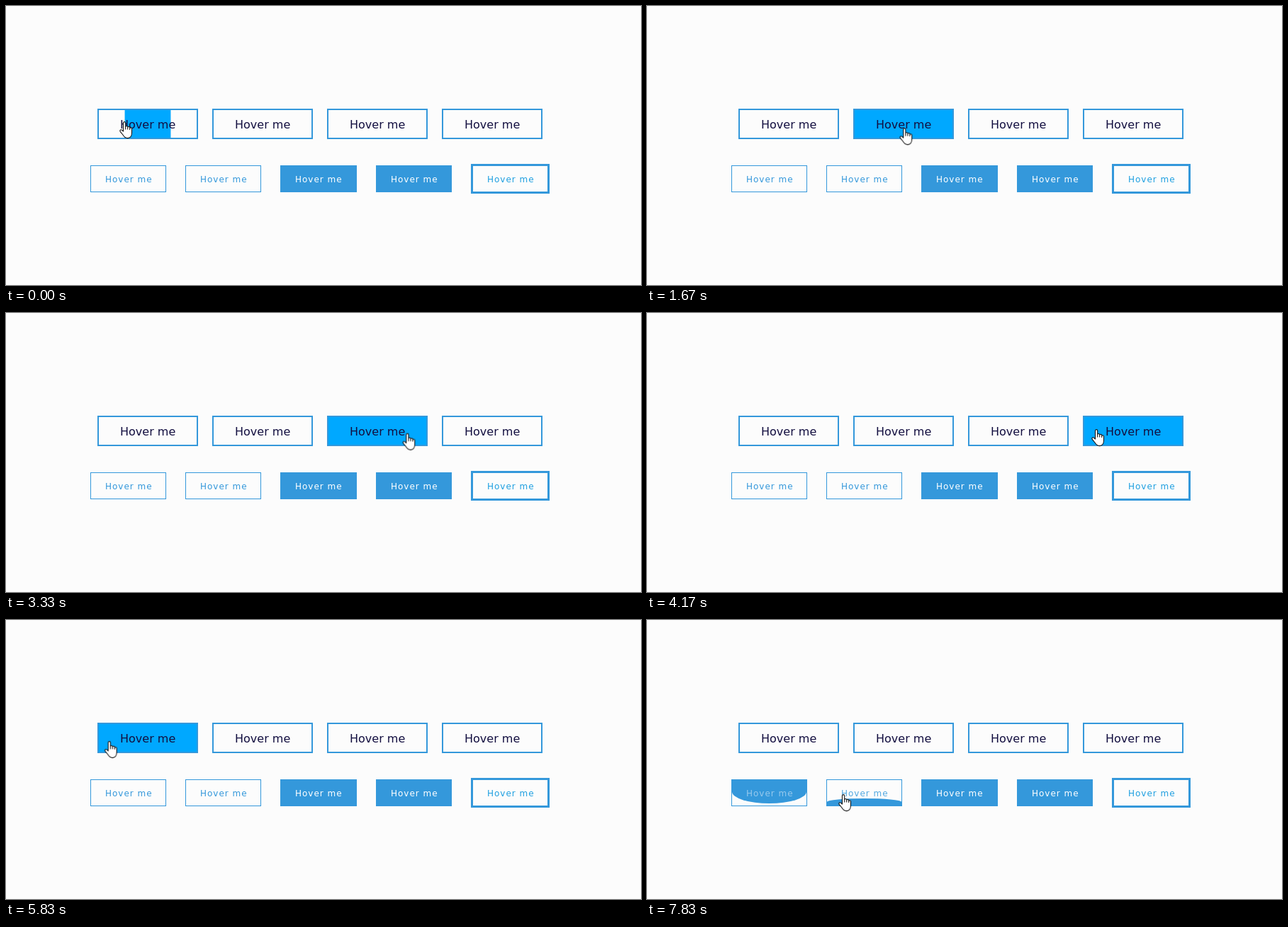
Write an HTML page that moves like this. It is 896x394 px and loops after 8 s.

```html
<!DOCTYPE html>
<html lang="en">
<head>
<meta charset="utf-8">
<title>Button hover effects</title>
<style>
  html, body { margin: 0; width: 100%; height: 100%; overflow: hidden; background: #fcfcfc; }
  body { position: relative; font-family: "DejaVu Sans", Verdana, sans-serif; }

  .btn {
    position: absolute; left: var(--x); box-sizing: border-box;
    overflow: hidden; border: solid #3498db; white-space: pre;
  }
  .btn span { position: absolute; top: 1px; }
  .btn i { position: absolute; }

  .large { top: 144.5px; width: 142px; height: 43px; border-width: 2px; font-size: 16px; line-height: 39px; color: #130f40; }
  .large span { left: 30px; }
  .large i { inset: 0; background: #00a8ff; }
  .large .diagonal { inset: -50px 0; }

  .small { top: 225px; width: 107px; height: 38px; border-width: 1px; font-size: 12px; line-height: 36px; letter-spacing: 1px; color: #3498db; }
  .small span { left: 20px; }
  .small i { left: 0; right: 0; background: #3498db; }
  .solid { background: #3498db; color: #fff; }
  .thick { top: 223px; width: 111px; height: 42px; border-width: 3px; color: #1e9fe0; }
  .from-top { top: 0; border-radius: 0 0 50% 50%; }
  .from-bottom { bottom: 0; border-radius: 50% 50% 0 0; }

  .btn i, .btn span, #cursor, #cursor path {
    animation-duration: 8s; animation-iteration-count: infinite; animation-timing-function: ease;
    animation-play-state: paused;
  }
  .widen { animation-name: widen; }
  .heighten { animation-name: heighten; }
  .fall { animation-name: fall; }
  .rise { animation-name: rise; }
  .from-top { animation-name: drop; }
  .from-bottom { animation-name: flood; }
  .from-top + span { animation-name: drop-text; }
  .from-bottom + span { animation-name: flood-text; }

  @keyframes widen {
    0% { transform: scaleX(.47); animation-timing-function: ease-out; }
    4.4%, 12.6% { transform: scaleX(1); }
    18.9%, 66.6% { transform: scaleX(0); }
    72.9%, 73.9% { transform: scaleX(1); }
    80.1%, 100% { transform: scaleX(0); }
  }
  @keyframes heighten {
    0%, 13.8% { transform: scaleY(0); }
    20%, 30.5% { transform: scaleY(1); }
    36.7%, 63.4% { transform: scaleY(0); }
    66.1% { transform: scaleY(.77); }
    66.67% { transform: scaleY(.73); }
    71.5%, 100% { transform: scaleY(0); }
  }
  @keyframes fall {
    0%, 31.2% { transform: rotate(45deg) scaleY(0); }
    37.4%, 44.4% { transform: rotate(45deg) scaleY(1); }
    50.6%, 61% { transform: rotate(45deg) scaleY(0); }
    63.2% { transform: rotate(45deg) scaleY(.57); }
    66.67% { transform: rotate(45deg) scaleY(.152); }
    68.5%, 100% { transform: rotate(45deg) scaleY(0); }
  }
  @keyframes rise {
    0%, 45.7% { transform: rotate(-45deg) scaleY(0); }
    51.9%, 60.6% { transform: rotate(-45deg) scaleY(1); }
    66.6%, 100% { transform: rotate(-45deg) scaleY(0); }
  }
  @keyframes drop {
    0%, 83.4% { height: 0; }
    89.6%, 95.8% { height: 65px; }
    97.9% { height: 33px; }
    100% { height: 10px; }
  }
  @keyframes drop-text {
    0%, 83.4% { color: #3498db; }
    89.6%, 95.8% { color: #fff; }
    97.9% { color: #96c9ed; }
    100% { color: #4ea5df; }
  }
  @keyframes flood {
    0%, 96.8% { height: 0; }
    97.9% { height: 9.5px; }
    100% { height: 45px; }
  }
  @keyframes flood-text {
    0%, 96.8% { color: #3498db; }
    97.9% { color: #52a8e0; }
    100% { color: #c0dff4; }
  }

  #cursor {
    position: absolute; left: 0; top: 0; width: 20px; height: 26px; overflow: visible;
    fill: #fff; stroke: #111; stroke-width: 1.1; stroke-linejoin: round;
    animation-name: roam; animation-timing-function: linear;
  }
  #cursor path { animation-timing-function: step-end; }
  #hand { animation-name: show-hand; }
  #arrow { animation-name: show-arrow; }

  @keyframes roam {
    0% { transform: translate(160px, 163px); }
    12.5% { transform: translate(265px, 171px); }
    13.8% { transform: translate(286px, 173px); }
    20% { transform: translate(350px, 172px); }
    30.5% { transform: translate(428px, 174px); }
    31.25% { transform: translate(449px, 175px); }
    37.5% { transform: translate(514px, 172px); }
    44.4% { transform: translate(589px, 168px); }
    45.7% { transform: translate(610px, 166px); }
    48% { transform: translate(634px, 165px); }
    52.08% { transform: translate(627px, 164px); }
    59.4% { transform: translate(632px, 165px); }
    60.6% { transform: translate(609px, 165px); }
    63.2% { transform: translate(447px, 165px); }
    66.1% { transform: translate(285px, 165px); }
    66.67% { transform: translate(262px, 165px); }
    68.8% { transform: translate(200px, 166px); }
    73.9% { transform: translate(124px, 172px); }
    77% { transform: translate(70px, 205px); }
    79.4% { transform: translate(54px, 235px); }
    83.33% { transform: translate(116px, 249px); }
    91.3% { transform: translate(184px, 249px); }
    95.8% { transform: translate(220px, 247px); }
    97.92%, 100% { transform: translate(270px, 246px); }
  }
  @keyframes show-hand {
    0% { visibility: visible; }
    66.5% { visibility: hidden; }
    67.5% { visibility: visible; }
    73.9% { visibility: hidden; }
    82.5%, 100% { visibility: visible; }
  }
  @keyframes show-arrow {
    0% { visibility: hidden; }
    66.5% { visibility: visible; }
    67.5% { visibility: hidden; }
    73.9% { visibility: visible; }
    82.5%, 100% { visibility: hidden; }
  }
</style>
</head>
<body>
  <div class="btn large" style="--x:129px"><i class="widen"></i><span>Hover me</span></div>
  <div class="btn large" style="--x:291px"><i class="heighten"></i><span>Hover me</span></div>
  <div class="btn large" style="--x:453px"><i class="diagonal fall"></i><span>Hover me</span></div>
  <div class="btn large" style="--x:615px"><i class="diagonal rise"></i><span>Hover me</span></div>

  <div class="btn small" style="--x:119px"><i class="from-top"></i><span>Hover me</span></div>
  <div class="btn small" style="--x:253px"><i class="from-bottom"></i><span>Hover me</span></div>
  <div class="btn small solid" style="--x:387px;width:108px"><span>Hover me</span></div>
  <div class="btn small solid" style="--x:522px"><span>Hover me</span></div>
  <div class="btn small thick" style="--x:656px"><span>Hover me</span></div>

  <svg id="cursor" viewBox="0 0 20 26">
    <path id="hand" d="M5.5 14V2.2a1.6 1.6 0 0 1 3.2 0V11V8a1.5 1.5 0 0 1 3 0V11V8.8a1.5 1.5 0 0 1 3 0V11.5V10.2a1.4 1.4 0 0 1 2.8 0V16C17.5 21 15 23.6 11.7 23.6C8 23.6 6.5 21.5 5 19L1.2 14.3C.2 12.3 2.2 11 3.6 12.2Z"/>
    <path id="arrow" d="M6.5 .5V16.8L10.3 13.2L12.8 19L15.2 18L12.7 12.2H17.8Z"/>
  </svg>

<script>
  // Hold every pose for a sixth of a second, like a 6 fps recording.
  const FPS = 6, LOOP = 8000;
  const animations = document.getAnimations();
  const start = performance.now();

  function render() {
    const time = (performance.now() - start + 4) % LOOP;
    const held = Math.floor(time * FPS / 1000) * 1000 / FPS;
    for (const animation of animations) animation.currentTime = held;
    requestAnimationFrame(render);
  }
  render();
</script>
</body>
</html>
```
